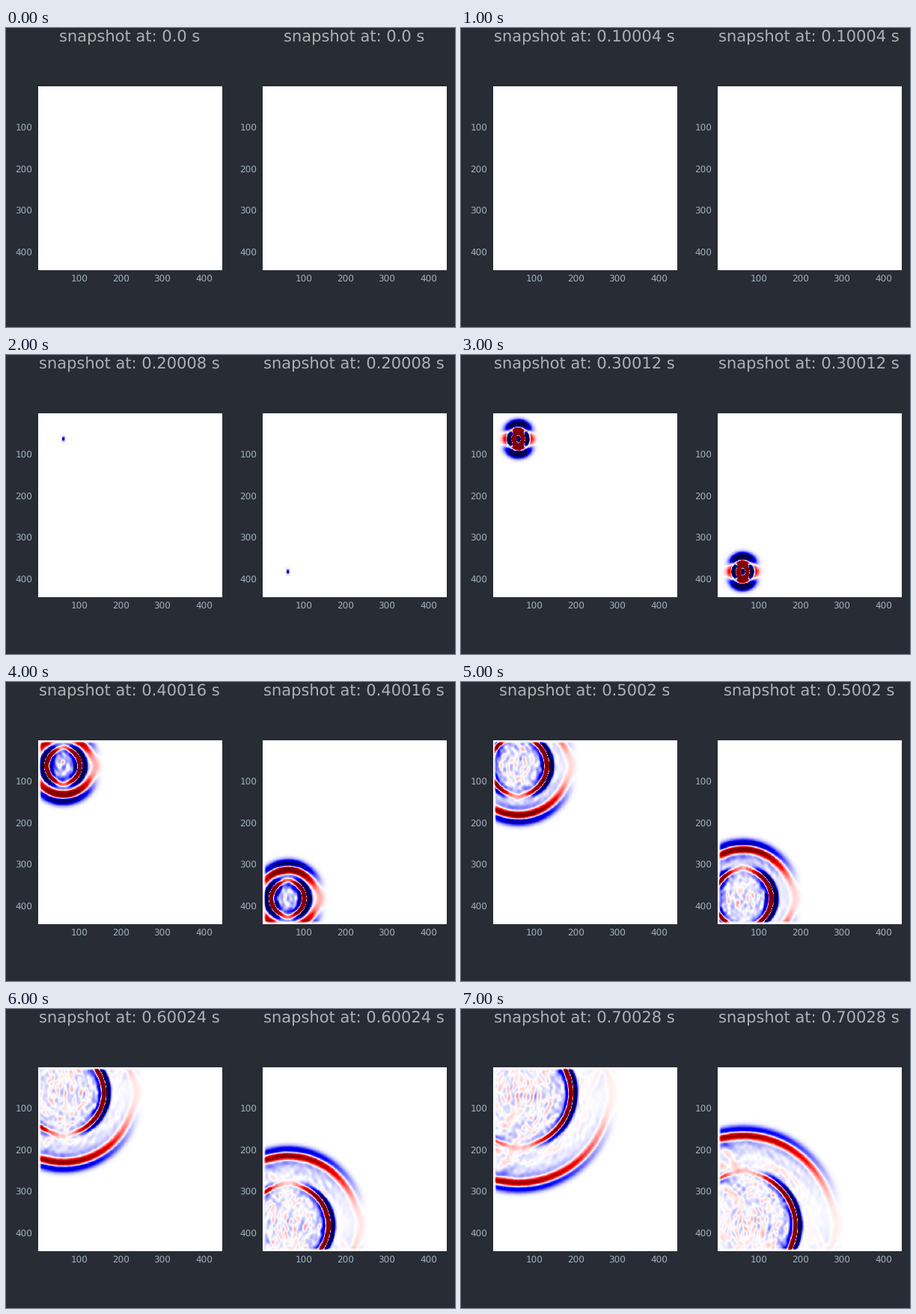
Write a matplotlib script that moves like this. It is 600 by 400 pixels and loops after 8000 ms.

```python
import matplotlib as mpl
import matplotlib.pyplot as plt
import numpy as np
from matplotlib.animation import FuncAnimation

W, H, DPI = 600, 400, 100
BACK, TITLE, TICK = "#282C34", "#ADB2B7", "#9EB1BE"
FRAMES, SNAP_DT = 8, 0.10004

CELLS = 442            # cells per side of a panel
REACH, PAD = 330, 30   # solved part of the panel, absorbing rim
SHOT_X, SHOT_Y = 60, 61
VP, VS = 495.0, 290.0  # cells per second
DT, T_START = 0.001, 0.15
T0, SIGMA = 0.25, 0.0177

mpl.rcParams.update({
    "font.family": "DejaVu Sans",
    "text.hinting": "none",
    "text.hinting_factor": 1,
})


def diff(a, axis, ahead):
    """Fourth-order staggered difference, half a cell ahead or behind."""
    if axis == 1:
        return diff(a.T, 0, ahead).T
    n, s = len(a), int(ahead)
    out = np.zeros_like(a)
    out[2:-2] = (a[2 + s:n - 2 + s] - a[1 + s:n - 3 + s]) * np.float32(9 / 8)
    out[2:-2] -= (a[3 + s:n - 1 + s] - a[s:n - 4 + s]) * np.float32(1 / 24)
    return out


def solve(seed):
    """Vertical velocity from a vertical point force in a rough elastic medium."""
    n = REACH + PAD
    rng = np.random.default_rng(seed)
    rough = 1 + np.clip(rng.normal(0, 0.2, (n, n)), -0.4, 0.4)
    mu = (rough * VS**2 * DT).astype(np.float32)
    stiff = (rough * VP**2 * DT).astype(np.float32)
    lam = stiff - 2 * mu

    depth = np.maximum(PAD - np.arange(n), 0)
    rim = np.exp(-(0.012 * depth) ** 2).astype(np.float32)
    damp = rim[:, None] * rim[None, :]

    vx, vy, sxx, syy, sxy = (np.zeros((n, n), np.float32) for _ in range(5))
    step_dt = np.float32(DT)
    snaps = []
    for step in range(1, 551):
        vx += step_dt * (diff(sxx, 1, True) + diff(sxy, 0, False))
        vy += step_dt * (diff(sxy, 1, False) + diff(syy, 0, True))
        u = (T_START + step * DT - T0) / SIGMA
        vy[PAD + SHOT_Y, PAD + SHOT_X] += u * np.exp(-u * u / 2)
        vx *= damp
        vy *= damp
        ex, ey = diff(vx, 1, False), diff(vy, 0, False)
        sxx += stiff * ex + lam * ey
        syy += lam * ex + stiff * ey
        sxy += mu * (diff(vy, 1, True) + diff(vx, 0, True))
        for stress in (sxx, syy, sxy):
            stress *= damp
        if step % 100 == 50:
            snaps.append(vy[PAD:, PAD:].copy())

    # colour range follows the outer front straight below the shot
    front = snaps[-1][SHOT_Y + 180:, SHOT_X - 10:SHOT_X + 11]
    clip = 1.1 * front.max(axis=0).mean()
    edge = np.minimum(np.arange(REACH) / 8, 1) ** 2
    fade = edge[:, None] * edge[None, :] / clip

    panels = [np.zeros((CELLS, CELLS)) for _ in range(FRAMES)]
    for panel, snap in zip(panels[2:], snaps):
        panel[:REACH, :REACH] = snap * fade
    return panels


fields = [solve(3), [p[::-1] for p in solve(8)]]

fig = plt.figure(figsize=(W / DPI, H / DPI), dpi=DPI, facecolor=BACK)


def label(x, y, text, px, color, ha="center"):
    return fig.text(x / W, 1 - y / H, text, fontsize=px * 72 / DPI,
                    color=color, ha=ha, va="baseline")


LEFT, TOP, SIDE = 42.5, 78.4, 245.6
cmap = mpl.colormaps["seismic"].resampled(511)
images, titles = [], []
for shift in (0, 300):
    ax = fig.add_axes([(LEFT + shift) / W, 1 - (TOP + SIDE) / H,
                       SIDE / W, SIDE / H])
    ax.axis("off")
    images.append(ax.imshow(np.zeros((CELLS, CELLS)), cmap=cmap, vmin=-1,
                            vmax=1, interpolation="nearest", aspect="auto"))
    for value in (100, 200, 300, 400):
        offset = (value - 0.5) * SIDE / CELLS
        label(LEFT + shift + offset, 340.3, str(value), 11.9, TICK)
        label(35.2 + shift, TOP + offset + 4.2, str(value), 11.9, TICK, "right")
    titles.append(label(165.2 + shift, 18.3, "", 20.83, TITLE))


def draw(k):
    for image, title, panels in zip(images, titles, fields):
        image.set_data(panels[k])
        title.set_text(f"snapshot at: {round(k * SNAP_DT, 5)} s")
    return images + titles


anim = FuncAnimation(fig, draw, frames=FRAMES, interval=1000,
                     repeat=True, repeat_delay=0)
plt.show()
```
